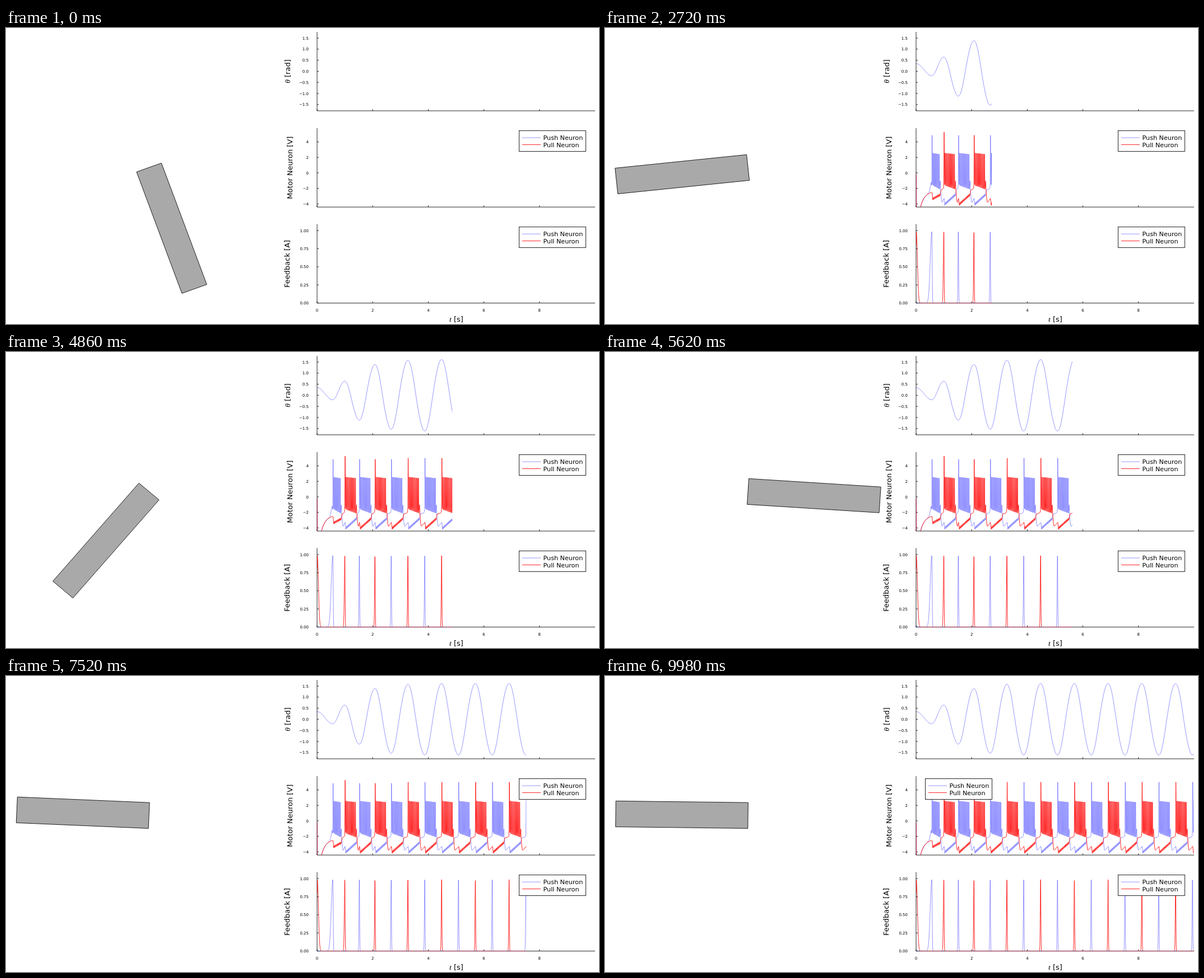
An HTML page that plays this animation: 1058x529 px, repeating every 10000 ms.

```html
<!DOCTYPE html>
<html lang="en">
<head>
<meta charset="utf-8">
<title>Driven pendulum</title>
<style>
  html, body { margin: 0; width: 100%; height: 100%; overflow: hidden; background: #fff; }
  svg { display: block; width: 100vw; height: 100vh; }
  text { font-family: "DejaVu Sans", sans-serif; font-size: 13px; }
  .tick { font-size: 7px; }
  .key { font-size: 11.2px; }
  .math { font-family: "Liberation Serif", serif; font-style: italic; font-size: 13.5px; }
  .axis { stroke: #000; stroke-width: .85; fill: none; }
  .push, .pull { fill: none; stroke-linejoin: round; }
  .push { stroke: #00f; stroke-width: .42; }
  .pull { stroke: #f00; stroke-width: .85; }
</style>
</head>
<body>
<svg viewBox="0 0 1058 529">
  <clipPath id="shown"></clipPath>
  <polygon id="rod" fill="#a9a9a9" stroke="#000" stroke-width=".85"/>
  <g id="axes"></g>
  <g id="lines" clip-path="url(#shown)"></g>
  <g id="keys"></g>
</svg>
<script>
const NS = 'http://www.w3.org/2000/svg';
const $ = id => document.getElementById(id);

function add(parent, tag, attrs, text) {
  const el = document.createElementNS(NS, tag);
  for (const k in attrs) el.setAttribute(k, attrs[k]);
  if (text) el.textContent = text;
  parent.appendChild(el);
  return el;
}

const X0 = 555, X1 = 1051, PX = 49.6;
const xOf = t => X0 + PX * t;

// zero: pixel of value 0, unit: pixels per unit
const angle = { top: 7, bottom: 148, zero: 77.4, unit: 39.6, from: -1.5, step: .5, count: 7, digits: 1 };
const motor = { top: 179, bottom: 320, zero: 258.9, unit: 13.85, from: -4, step: 2, count: 5, digits: 0 };
const feed = { top: 350.5, bottom: 491.6, zero: 491.6, unit: 129.6, from: 0, step: .25, count: 5, digits: 2 };
const panels = [angle, motor, feed];

// Turning points of the swing
const turnT = [0, .565, .998, 1.52, 2.081, 2.666, 3.266, 3.872];
const turnV = [.35, -.2, .64, -1.12, 1.39, -1.53, 1.58, -1.61];
for (let i = 0; i < 11; i++) {
  turnT.push(4.479 + .607 * i);
  turnV.push(i % 2 ? -1.615 : 1.615);
}

function theta(t) {
  let i = 0;
  while (t >= turnT[i + 1]) i++;
  const u = (t - turnT[i]) / (turnT[i + 1] - turnT[i]);
  const w = u + Math.min(.02, .008 * i) * Math.sin(Math.PI * u) ** 2;
  const a = turnV[i], b = turnV[i + 1];
  return (a + b) / 2 + (a - b) / 2 * Math.cos(Math.PI * w);
}

// Feedback pulses at every other turning point; the first ones are wider
function feedback(t, first) {
  let v = 0;
  for (let i = first; i < turnT.length; i += 2) {
    const d = t - turnT[i] - (i ? .001 : .008);
    const rise = i === 1 ? .056 : i === 2 ? .018 : .0125;
    const fall = i === 0 ? .041 : i === 1 ? .013 : .01;
    v += .985 * Math.exp(-.5 * (d / (d < 0 ? rise : fall)) ** 2);
  }
  return v;
}

// Half-centre oscillator: one neuron bursts while the other is held down
function voltage(n) {
  const p = [[0, -.2], [.004, -6], [.1, -6], [.16, -4.4], [.2, -3.92], [.24, -3.58],
    [.28, -3.3], [.32, -3.08], [.4, -2.8]];
  if (n === 0) p.push([.46, -2.58], [.49, -2.2], [.52, -1.6], [.545, -1.2]);
  else p.push([.48, -2.62], [.56, -2.54]);
  for (let i = 0; i < turnT.length - 2; i++) {
    const s = turnT[i + 1] + .011, next = turnT[i + 2] + .011;
    const len = i ? .39 : .275, e = s + len;
    const spikes = i ? 10 : 7, b = s + .018, gap = (e - b) / spikes;
    if (i % 2 === n) {
      p.push([s - .014, -1.6], [s, i === 1 ? 5.25 : i < 5 ? 4.85 : 5], [b, -1.5]);
      for (let j = 1; j <= spikes; j++) {
        const f = j / spikes, low = -1.6 - .5 * f;
        p.push([b + (j - .75) * gap, low + .5], [b + (j - .5) * gap, 2.57 - .15 * f],
          [b + (j - .2) * gap, low]);
      }
      p.push([e + .02, -1.05], [e + .036, -2.3], [e + .055, -3.2],
        [e + .075, -3.75], [e + .095, -3.78], [next - .005, -3.3]);
    } else {
      const low = i ? -4.2 : -3.5, high = -3;
      p.push([s, i ? -3.3 : -2.55], [b + .008, low]);
      for (let j = 1; j <= spikes; j++) {
        const v = low + (high - low) * j / spikes;
        p.push([b + (j - .2) * gap, v + .27], [b + (j + .2) * gap, v]);
      }
      p.push([e + .03, -2.55], [e + .05, -2.22], [next - .05, -2.08], [next - .022, -1.95]);
    }
  }
  return p;
}

function sample(f, dt) {
  const p = [];
  for (let t = 0; t <= 10.02; t += dt) p.push([t, f(t)]);
  return p;
}

function draw(panel, cls, pts) {
  const points = pts.map(([t, v]) =>
    xOf(t).toFixed(2) + ',' + (panel.zero - panel.unit * v).toFixed(2)).join(' ');
  add($('lines'), 'polyline', { class: cls, points });
}

function upright(x, y, text, symbol) {
  const el = add($('axes'), 'text', { transform: `translate(${x} ${y}) rotate(-90)`, 'text-anchor': 'middle' });
  if (symbol) add(el, 'tspan', { class: 'math' }, symbol);
  el.append(text);
}

function legend(x, y) {
  const g = add($('keys'), 'g', { transform: `translate(${x} ${y})` });
  add(g, 'rect', { class: 'axis', width: 119, height: 37, style: 'fill:#fff' });
  ['Push', 'Pull'].forEach((name, i) => {
    const row = 12.6 + 12.4 * i;
    add(g, 'path', { class: name.toLowerCase(), d: `M5.5 ${row}h33` });
    add(g, 'text', { class: 'key', x: 43, y: row + 4.1 }, name + ' Neuron');
  });
  return g;
}

const windows = panels.map(p => {
  let d = `M${X0} ${p.top}V${p.bottom}H${X1}`;
  for (let i = 0; i < p.count; i++) {
    const v = p.from + i * p.step, y = p.zero - v * p.unit;
    d += `M${X0} ${y}h3`;
    add($('axes'), 'text', { class: 'tick', x: 540, y: y + 2.6, 'text-anchor': 'end' },
      v.toFixed(p.digits).replace('-', '\u2212'));
  }
  for (let t = 0; t < 10; t += 2) {
    d += `M${xOf(t)} ${p.bottom}v-3`;
    if (p === feed) add($('axes'), 'text', { class: 'tick', x: xOf(t), y: 506.6, 'text-anchor': 'middle' }, String(t));
  }
  add($('axes'), 'path', { class: 'axis', d });
  return add($('shown'), 'rect', { x: X0 - .3, y: p.top, height: p.bottom - p.top + .1 });
});

upright(506.5, 77.5, ' [rad]', '\u03b8');
upright(511.3, 249.7, 'Motor Neuron [V]');
upright(506.3, 421.4, 'Feedback [A]');
const timeLabel = add($('axes'), 'text', { x: 803.5, y: 525, 'text-anchor': 'middle' });
add(timeLabel, 'tspan', { class: 'math' }, 't');
timeLabel.append(' [s]');

draw(angle, 'push', sample(theta, .01));
draw(motor, 'push', voltage(0));
draw(motor, 'pull', voltage(1));
draw(feed, 'push', sample(t => feedback(t, 1), .004));
draw(feed, 'pull', sample(t => feedback(t, 0), .004));

const motorKey = legend(915.5, 183.5);
legend(915.5, 355.5);

function rodPoints(a) {
  const sin = Math.sin(a), cos = Math.cos(a);
  return [[-.1, 0], [.1, 0], [.1, 1], [-.1, 1]].map(([w, l]) =>
    (255.1 + 236 * (w * cos + l * sin)).toFixed(2) + ',' +
    (249.3 + 231 * (l * cos - w * sin)).toFixed(2)).join(' ');
}

function render(ms) {
  const t = Math.floor(ms % 10000 / 20 + 1e-6) * .02;
  $('rod').setAttribute('points', rodPoints(theta(t)));
  for (const w of windows) w.setAttribute('width', t ? Math.min(PX * t + .5, X1 - X0 + .3) : 0);
  motorKey.setAttribute('transform', `translate(${t < 9.68 ? 915.5 : 571.5} 183.5)`);
}

let start;
function tick(now) {
  start ??= now;
  render(now - start);
  requestAnimationFrame(tick);
}
render(0);
requestAnimationFrame(tick);
</script>
</body>
</html>
```
